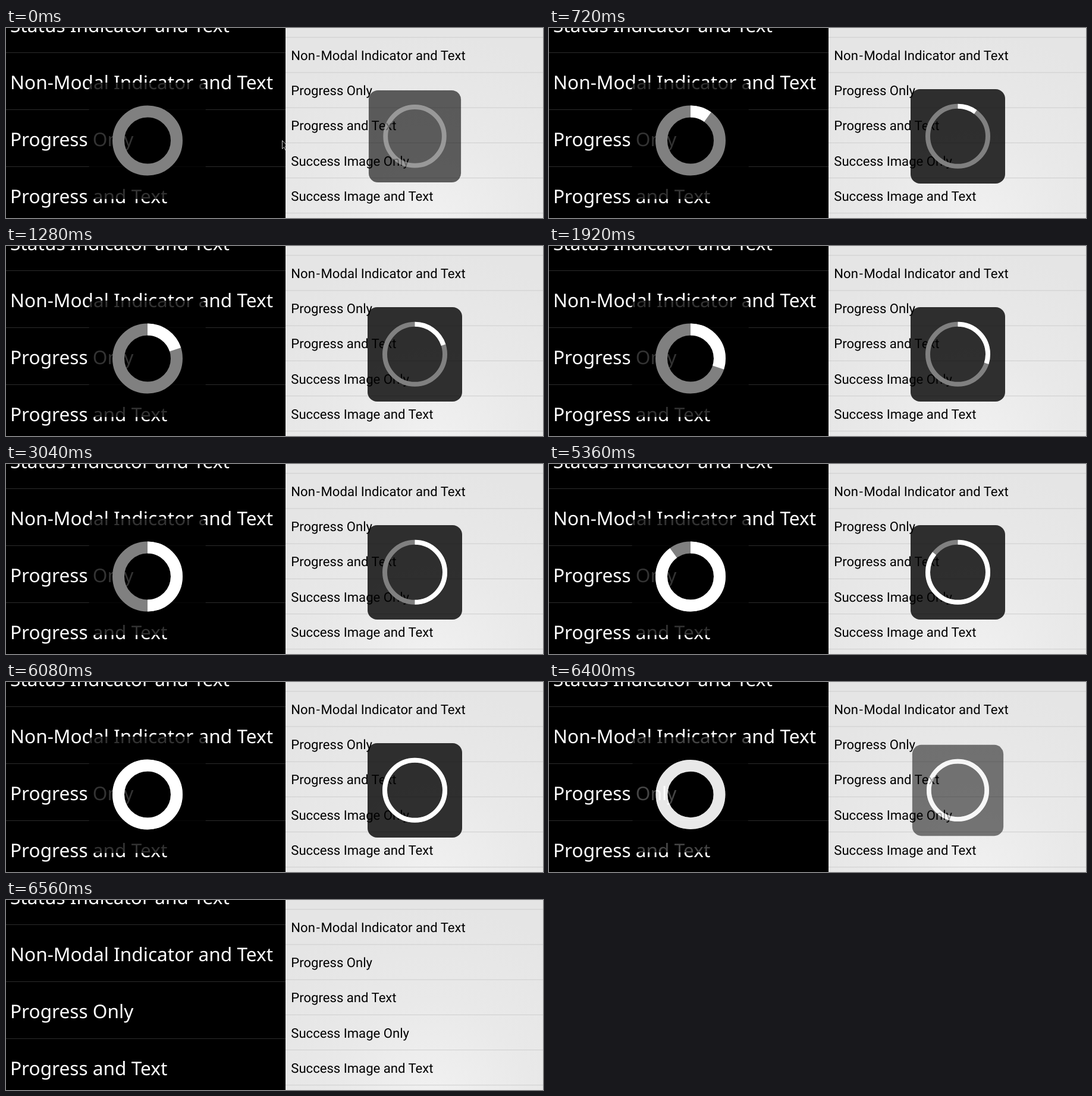
Animation of 903 by 320 pixels, one loop 6.64 s. Source, as an HTML page:

```html
<!DOCTYPE html>
<html lang="en">
<head>
<meta charset="utf-8">
<title>Progress HUD</title>
<style>
  html, body { margin: 0; width: 100%; height: 100%; overflow: hidden; background: #000; }
  svg { display: block; width: 903px; height: 320px; }
  text { text-rendering: geometricPrecision; white-space: pre; }
  #darkList text { font: 31.6px "Noto Sans", "Open Sans", sans-serif; fill: #fff; }
  #lightList text { font: 22.1px Roboto, sans-serif; fill: #000; }
  circle { fill: none; }
</style>
</head>
<body>
<svg viewBox="0 0 903 320">
  <defs>
    <radialGradient id="glow" gradientUnits="userSpaceOnUse" cx="715" cy="335" r="330">
      <stop offset="0" stop-color="#f1f1f1"/>
      <stop offset=".5" stop-color="#e9e9e9"/>
      <stop offset="1" stop-color="#e5e5e5"/>
    </radialGradient>
    <clipPath id="darkClip"><rect width="470" height="320"/></clipPath>
  </defs>
  <g clip-path="url(#darkClip)">
    <rect width="470" height="320"/>
    <g id="darkList"></g>
    <g id="darkHud"></g>
    <path id="cursor" d="M464.5 189.5V203.5L467.5 200.5L470 206L472 205L469.7 199.5H474Z" fill="#000" stroke="#ccc"/>
  </g>
  <rect x="470" width="433" height="320" fill="url(#glow)"/>
  <g id="lightList"></g>
  <g id="lightHud"></g>
</svg>
<script>
const LOOP = 6640, TICK = 80;
const FIRST_STEP = 480, STEP = 600, SWEEP = 140;
const $ = id => document.getElementById(id);

function add(parent, tag, attrs, content = '') {
  const el = document.createElementNS('http://www.w3.org/2000/svg', tag);
  for (const name in attrs) el.setAttribute(name, attrs[name]);
  el.textContent = content;
  return parent.appendChild(el);
}

function makeList(id, rows, { x, y, pitch, left, width, lineY, line }) {
  const list = $(id);
  for (let i = 0; i < 6; i++) {
    add(list, 'rect', { x: left, y: lineY + i * pitch, width, height: 1, fill: line });
  }
  rows.forEach((row, i) => add(list, 'text', { x, y: y + i * pitch }, row));
  return list;
}

makeList('darkList',
  ['Status Indicator and Text', 'Non-Modal Indicator and Text', 'Progress Only', 'Progress and Text'],
  { x: 7, y: 7, pitch: 96, left: 0, width: 470, lineY: 41, line: '#2b2b2b' });

const light = makeList('lightList',
  ['Non-Modal Indicator and Text', 'Progress Only', 'Progress and Text', 'Success Image Only', 'Success Image and Text'],
  { x: 479.3, y: 54, pitch: 59.2, left: 470, width: 433, lineY: 15.3, line: '#cecece' });
// wider hyphen spacing
light.querySelector('text').setAttribute('dx', '0 0 0 1.8 1.8');

function makeHud(id, box, ring) {
  const group = $(id);
  add(group, 'rect', { x: box.cx - box.half, y: box.cy - box.half, width: box.half * 2,
    height: box.half * 2, rx: box.rx, fill: '#000', 'fill-opacity': 0.8 });
  const arc = { cx: ring.cx, cy: ring.cy, r: ring.r, 'stroke-width': ring.w };
  add(group, 'circle', { ...arc, stroke: '#808080' });
  const bar = add(group, 'circle', { ...arc, stroke: '#fff', pathLength: 100,
    transform: `rotate(-90 ${ring.cx} ${ring.cy})` });
  return (alpha, percent) => {
    const s = 0.9 + 0.1 * alpha;
    group.setAttribute('opacity', alpha);
    group.setAttribute('transform',
      `translate(${box.cx} ${box.cy}) scale(${s}) translate(${-box.cx} ${-box.cy})`);
    bar.setAttribute('stroke', percent > 0 ? '#fff' : 'none');
    bar.setAttribute('stroke-dasharray', percent >= 100 ? 'none' : `${percent} 100`);
  };
}

const drawDark = makeHud('darkHud',
  { cx: 237.7, cy: 190, half: 98, rx: 8 }, { cx: 238, cy: 189.5, r: 49, w: 20 });
const drawLight = makeHud('lightHud',
  { cx: 687.5, cy: 182.5, half: 79.5, rx: 16 }, { cx: 687.5, cy: 182.3, r: 50.5, w: 8 });

// [time, opacity]
const darkFade = [[0, 1], [6320, 1], [6400, 0.91], [6480, 0.4], [6560, 0]];
const lightFade = [[0, 0.76], [160, 1], [6320, 1], [6400, 0.64], [6480, 0.2], [6560, 0]];

function sample(keys, t) {
  const i = keys.findIndex(key => key[0] > t);
  if (i < 0) return keys[keys.length - 1][1];
  const [t0, v0] = keys[i - 1], [t1, v1] = keys[i];
  return v0 + (v1 - v0) * (t - t0) / (t1 - t0);
}

function draw(time) {
  const t = time < 2 * TICK ? 0 : Math.floor(time / TICK) * TICK;
  const since = t - FIRST_STEP;
  const steps = Math.max(0, Math.min(10, Math.floor(since / STEP) + 1));
  const sweep = steps ? Math.min(1, (since - (steps - 1) * STEP) / SWEEP) : 0;
  drawDark(sample(darkFade, t), steps * 10);
  drawLight(sample(lightFade, t), steps ? (steps - 1 + sweep) * 10 : 0);
  $('cursor').setAttribute('visibility', t ? 'hidden' : 'visible');
}

const start = performance.now();
function frame() {
  draw((performance.now() - start) % LOOP);
  requestAnimationFrame(frame);
}
frame();
</script>
</body>
</html>
```
